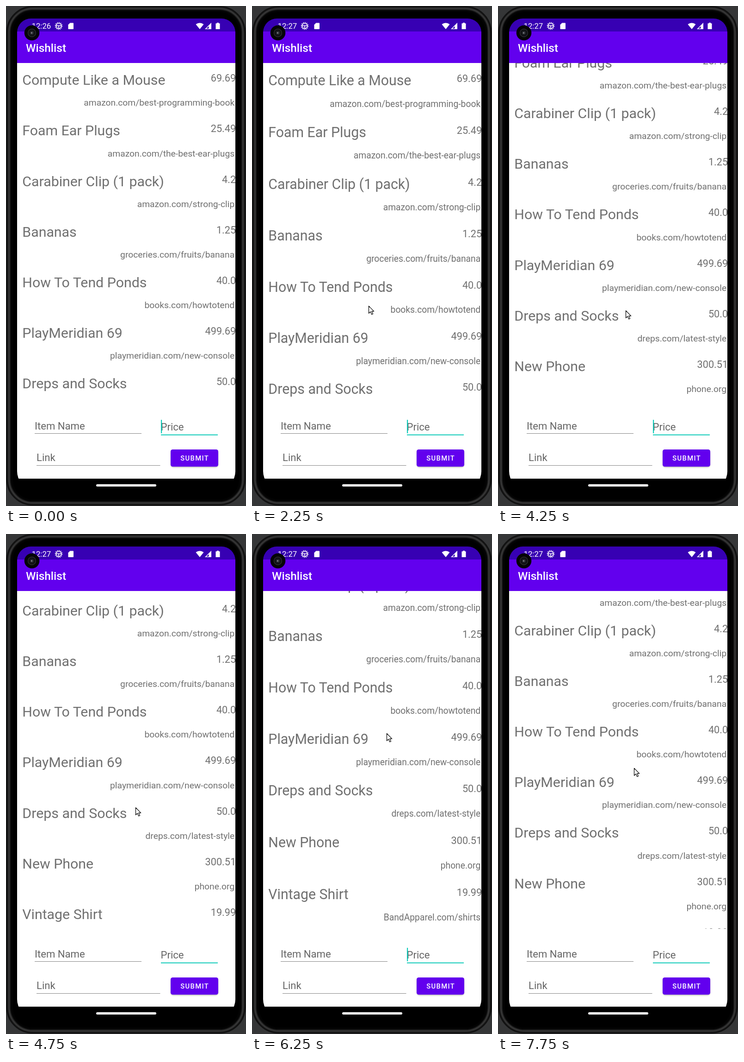
Animation of 519 by 1079 pixels, one loop 8000 ms. Source, as an HTML page:

```html
<!DOCTYPE html>
<html lang="en">
<head>
<meta charset="utf-8">
<title>Wishlist</title>
<style>
html, body { margin: 0; width: 100%; height: 100%; overflow: hidden; background: #353637; }
svg { display: block; width: 519px; height: 1079px; font-family: Roboto, sans-serif; }
.name, .price, .link { fill: #707070; }
.name { font-size: 30.3px; }
.price { font-size: 21.7px; text-anchor: end; }
.link { font-size: 19.28px; text-anchor: end; }
.hint { fill: #666; font-size: 22.1px; }
.bold { fill: #fff; font-weight: 500; }
</style>
</head>
<body>
<svg viewBox="0 0 519 1079">
  <defs>
    <clipPath id="screen">
      <path d="M24 57A30 30 0 0 1 54 27H466A30 30 0 0 1 496 57V1004A40 40 0 0 1 456 1044H64A40 40 0 0 1 24 1004Z"/>
    </clipPath>
    <clipPath id="view"><rect x="24" y="123" width="472" height="729"/></clipPath>
    <filter id="blur" x="-10%" y="-30%" width="120%" height="160%"><feGaussianBlur stdDeviation="1.5"/></filter>
  </defs>

  <!-- phone body -->
  <rect width="519" height="1079" fill="#353637"/>
  <rect x="1.5" y="1" width="516" height="1076" rx="56" fill="#030303" stroke="#111" stroke-width="2"/>
  <rect x="6.500" y="5.500" width="506" height="1067" rx="51" fill="none" stroke="#424242" stroke-width="4" filter="url(#blur)"/>
  <rect x="15" y="13" width="489" height="1052" rx="43" fill="#000"/>

  <g clip-path="url(#screen)">
    <rect x="24" y="123" width="472" height="897" fill="#fff"/>
    <g id="list" clip-path="url(#view)"></g>
    <rect x="24" y="27" width="472" height="29" fill="#3700b3"/>
    <rect x="24" y="55" width="472" height="68" fill="#6200ee"/>
  </g>
  <text class="bold" x="43" y="99" font-size="24.400">Wishlist</text>

  <!-- status bar -->
  <g fill="#fff">
    <text id="clock" x="55.500" y="49" font-size="16.800"></text>
    <g fill="none" stroke="#fff">
      <circle cx="114" cy="43" r="5.600" stroke-width="1.500"/>
      <circle cx="114" cy="43" r="7.300" stroke-width="1.800" stroke-dasharray="1.900 1.920"/>
      <path d="M109 42.500H119M114 43V48" stroke-width="1.500"/>
    </g>
    <path d="M138.500 36.500H145Q146 36.500 146 37.500V49Q146 50 145 50H135.500Q134.500 50 134.500 49V40.500Z"/>
    <path d="M410.500 39.500Q419 33.500 427.500 39.500L419 50Z"/>
    <path fill-rule="evenodd" d="M444 36V50H430ZM442.700 39.300L433.300 48.700H438.500V43.500Z"/>
    <path d="M453.500 37.500H456V36H460V37.500H462.500V50H453.500Z"/>
  </g>

  <!-- camera -->
  <circle cx="56" cy="58" r="16.300" fill="#050506"/>
  <circle cx="56" cy="58" r="8.500" fill="#101114" stroke="#2c2c30" stroke-width="1.500"/>
  <circle cx="56" cy="58" r="4" fill="#26282d"/>
  <circle cx="55.500" cy="58" r="1.600" fill="#888b90"/>

  <!-- form -->
  <text class="hint" x="62" y="913.500">Item Name</text>
  <text class="hint" x="334.500" y="916">Price</text>
  <text class="hint" x="66" y="982">Link</text>
  <path d="M62 922.500H293M66 991.500H333.500" stroke="#858585"/>
  <path d="M335 925.500H458" stroke="#10cbb9" stroke-width="2"/>
  <rect id="caret" x="335" y="893" width="2.200" height="29" fill="#10cbb9"/>
  <rect x="356.500" y="959" width="102" height="36.500" rx="5" fill="#000" opacity=".3" filter="url(#blur)"/>
  <rect x="356" y="957" width="103" height="37" rx="4.500" fill="#6200ee"/>
  <text class="bold" x="377.300" y="981.300" font-size="14.800" letter-spacing="1.320">SUBMIT</text>
  <rect x="195" y="1032" width="130" height="5" rx="2.500" fill="#fff"/>

  <path id="pointer" d="M.5.5V16.200L4.200 12.800L6.900 18.700L9.500 17.500L6.800 11.800H11.700Z" fill="#fff" stroke="#000" stroke-width="1.200" stroke-linejoin="round"/>
</svg>
<script>
const LOOP = 8000, STEP = 250, TOP = 123, BOTTOM = 852, PITCH = 109.2;
const MAX_SCROLL = 254, PRESS_Y = 548, LOW_Y = 805, HIGH_Y = 421;
const FIRST = 4, LOW = 13, HIGH = 26; // steps: pointer appears, turns up, turns down

const items = [
  ["Compute Like a Mouse", "69.69", "amazon.com/best-programming-book"],
  ["Foam Ear Plugs", "25.49", "amazon.com/the-best-ear-plugs"],
  ["Carabiner Clip (1 pack)", "4.2", "amazon.com/strong-clip"],
  ["Bananas", "1.25", "groceries.com/fruits/banana"],
  ["How To Tend Ponds", "40.0", "books.com/howtotend"],
  ["PlayMeridian 69", "499.69", "playmeridian.com/new-console"],
  ["Dreps and Socks", "50.0", "dreps.com/latest-style"],
  ["New Phone", "300.51", "phone.org"],
  ["Vintage Shirt", "19.99", "BandApparel.com/shirts"]
];
const columns = [["name", 35.3, 170.2], ["price", 497.2, 163.2], ["link", 494.2, 215.4]];

// Pointer height at each step from FIRST on
const pointerY = [548, 553, 570, 592, 618, 647, 685, 728, 770, 805,
  781, 742, 697, 657, 622, 590, 560, 532, 506,
  478, 450, 430, 421, 427, 443, 461, 482, 505];
const pointerX = [[4, 246], [9, 252], [14, 265], [17, 276], [22, 287], [28, 295], [31, 294]];

const $ = id => document.getElementById(id);
const list = $("list"), clock = $("clock"), caret = $("caret"), pointer = $("pointer");

const labels = items.flatMap((item, row) => columns.map(([kind, x, y], i) => {
  const node = document.createElementNS("http://www.w3.org/2000/svg", "text");
  node.setAttribute("class", kind);
  node.textContent = item[i];
  list.append(node);
  return { node, x, y: y + row * PITCH };
}));

function between(keys, at) {
  const i = Math.max(1, keys.findIndex(key => key[0] >= at));
  const [a, from] = keys[i - 1], [b, to] = keys[i];
  return from + (to - from) * (at - a) / (b - a);
}

function listState(step, y) {
  if (step < FIRST) return { scroll: 0, pull: 0, down: true };
  if (step <= LOW) return { scroll: 0, pull: y - PRESS_Y, down: true };
  if (step <= HIGH) {
    const drag = (LOW_Y - y) * .99;
    return { scroll: Math.min(MAX_SCROLL, drag), pull: Math.max(0, drag - MAX_SCROLL), down: false };
  }
  const pull = Math.max(0, 130 - 90 * (step - HIGH));
  return { scroll: MAX_SCROLL - (y - HIGH_Y), pull, down: false };
}

// Overscroll stretch, strongest next to the edge being pulled
function stretch(y, { pull, down }) {
  const amount = .0003 * pull * (1 - pull / 900), fade = .00051;
  const u = down ? y - TOP : BOTTOM - y;
  const shift = amount * (u - fade * u * u);
  return [y + (down ? shift : -shift), 1 + amount * (1 - 2 * fade * u)];
}

function draw(time) {
  const t = time % LOOP, step = Math.floor(t / STEP);
  const y = pointerY[Math.max(0, step - FIRST)];
  const state = listState(step, y);
  for (const label of labels) {
    const [ly, scale] = stretch(label.y - state.scroll, state);
    label.node.setAttribute("transform", `translate(${label.x} ${ly.toFixed(2)}) scale(1 ${scale.toFixed(4)})`);
  }
  clock.textContent = t < 500 ? "12:26" : "12:27";
  caret.style.display = t % 1000 < 500 ? "" : "none";
  pointer.style.display = step < FIRST ? "none" : "";
  if (step >= FIRST) pointer.setAttribute("transform", `translate(${Math.round(between(pointerX, step))} ${y})`);
}

const start = performance.now();
function tick() {
  draw(performance.now() - start);
  requestAnimationFrame(tick);
}
tick();
</script>
</body>
</html>
```
